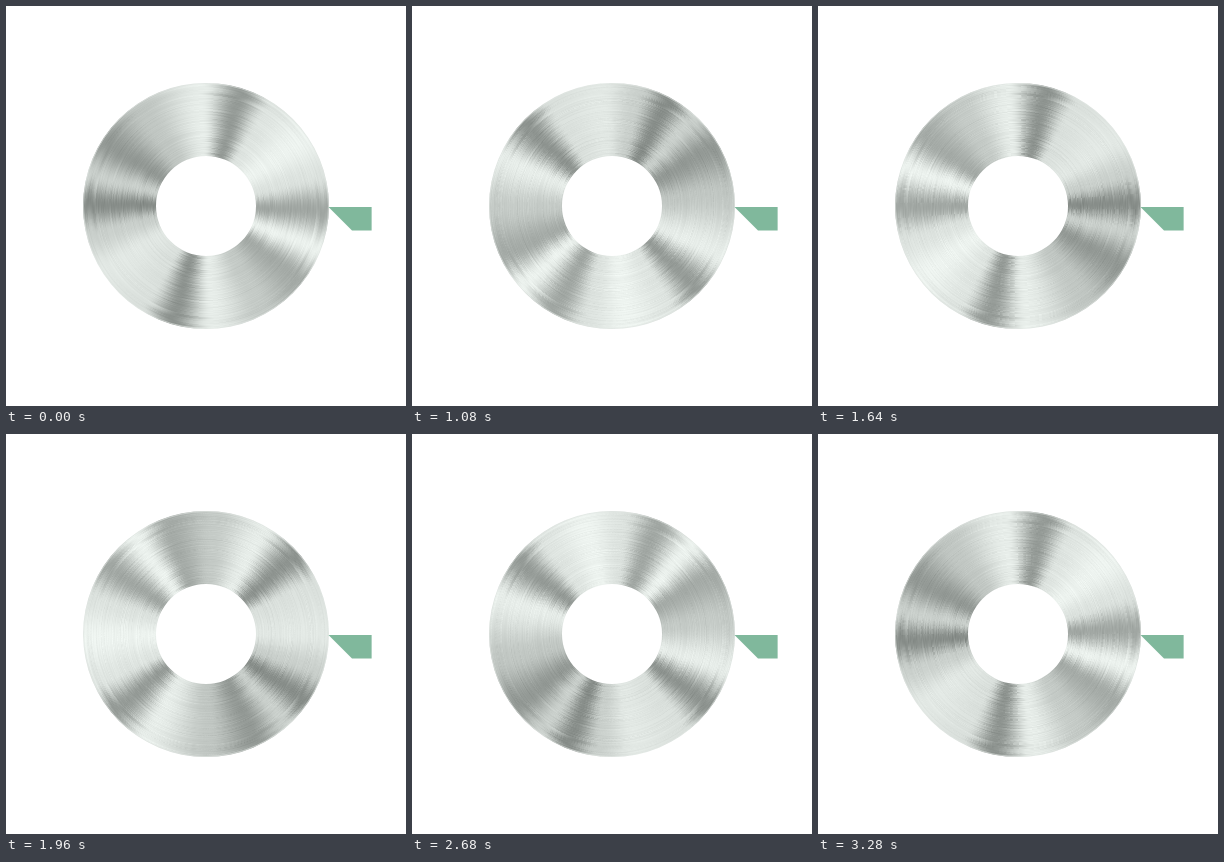
These frames come from a looping animation (400 by 400 pixels, 3.32 s). An HTML page with a canvas:

```html
<!DOCTYPE html>
<html lang="en">
<head>
<meta charset="utf-8">
<title>Spinning disc</title>
<style>
  html, body { margin: 0; width: 100%; height: 100%; overflow: hidden; background: #fff; }
  canvas { display: block; width: 400px; height: 400px; }
</style>
</head>
<body>
<canvas id="stage" width="400" height="400"></canvas>
<script>
const ctx = document.getElementById('stage').getContext('2d');
const TAU = Math.PI * 2;
const CENTER = 200, OUTER = 123, INNER = 50;
const FRAME_MS = 40, FRAMES = 83;
const SIZE = 500, SCALE = 2;

// Brightness around the disc: [degrees clockwise from the right, level]
const sheen = [
  [2, 164], [21, 240], [38, 168], [62, 200], [87, 235], [106, 145],
  [122, 222], [148, 230], [166, 205], [181, 138], [195, 206], [212, 150],
  [236, 196], [268, 235], [287, 152], [303, 226], [326, 241], [345, 224], [362, 164]
];

function randomizer(seed) {
  return () => (seed = (seed * 16807) % 2147483647) / 2147483647;
}

function sheenAt(degrees) {
  const first = sheen[0][0];
  const a = ((degrees - first) % 360 + 360) % 360 + first;
  const i = Math.max(1, sheen.findIndex(stop => stop[0] >= a));
  const [a0, v0] = sheen[i - 1], [a1, v1] = sheen[i];
  const p = (a - a0) / (a1 - a0);
  return v0 + (v1 - v0) * p * p * (3 - 2 * p);
}

function makeTexture() {
  const random = randomizer(4711);
  const rings = Array.from({ length: 400 }, () => ({
    level: (random() + random() - 1) * 6,
    shift: (random() + random() - 1) * 3,
    arc: random() * 5,
    waves: 1 + Math.floor(random() * 4),
    phase: random() * TAU
  }));
  const levels = Array.from({ length: 3600 }, (_, i) => sheenAt(i / 10));
  const texture = document.createElement('canvas');
  texture.width = texture.height = SIZE;
  const pen = texture.getContext('2d');
  const image = pen.createImageData(SIZE, SIZE);

  for (let y = 0; y < SIZE; y++) {
    for (let x = 0; x < SIZE; x++) {
      const dx = x + 0.5 - SIZE / 2, dy = y + 0.5 - SIZE / 2;
      const angle = Math.atan2(dy, dx);
      const ring = rings[Math.floor(Math.hypot(dx, dy))];
      const degrees = angle * 360 / TAU + ring.shift + 720;
      const level = levels[Math.floor(degrees * 10) % 3600] + ring.level
        + ring.arc * Math.sin(ring.waves * angle + ring.phase);
      const at = (y * SIZE + x) * 4;
      image.data[at] = level - 4;
      image.data[at + 1] = level + 2;
      image.data[at + 2] = level - 2;
      image.data[at + 3] = 255;
    }
  }
  pen.putImageData(image, 0, 0);
  return texture;
}

const texture = makeTexture();

function drawDisc(angle) {
  ctx.save();
  ctx.translate(CENTER, CENTER);
  ctx.beginPath();
  ctx.arc(0, 0, OUTER, 0, TAU);
  ctx.moveTo(INNER, 0);
  ctx.arc(0, 0, INNER, 0, TAU);
  ctx.clip('evenodd');
  ctx.rotate(angle);
  const side = SIZE / SCALE;
  ctx.drawImage(texture, -side / 2, -side / 2, side, side);
  ctx.beginPath();
  ctx.arc(0, 0, OUTER - 0.5, 0, TAU);
  ctx.strokeStyle = 'rgba(225, 231, 227, 0.6)';
  ctx.lineWidth = 1;
  ctx.stroke();
  ctx.restore();
}

function drawPointer() {
  ctx.fillStyle = '#80b89c';
  ctx.beginPath();
  ctx.moveTo(322.5, 201);
  ctx.lineTo(365.6, 201);
  ctx.lineTo(365.6, 224.6);
  ctx.lineTo(346, 224.6);
  ctx.fill();
}

function render(time) {
  const step = Math.floor(time / FRAME_MS) % FRAMES;
  ctx.fillStyle = '#fff';
  ctx.fillRect(0, 0, 400, 400);
  drawDisc(step / FRAMES * TAU);
  drawPointer();
}

const start = performance.now();
function tick() {
  render(performance.now() - start);
  requestAnimationFrame(tick);
}
tick();
</script>
</body>
</html>
```
